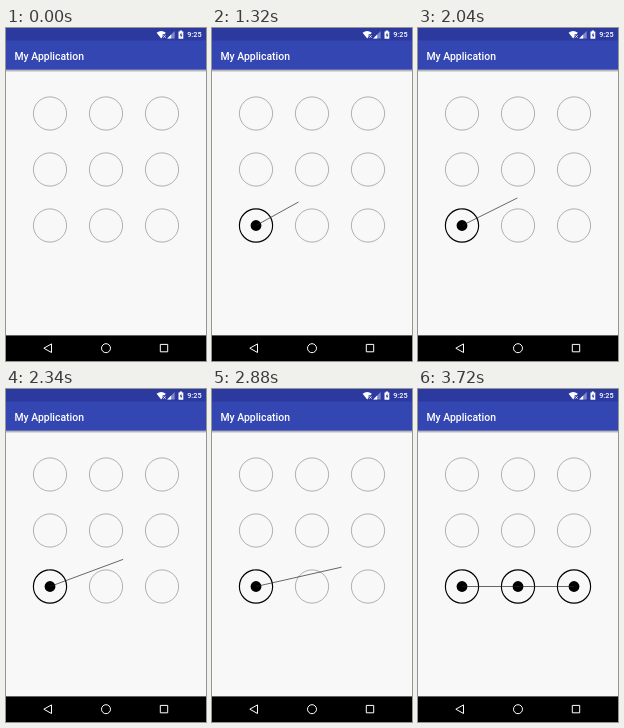
Recreate the animation shown at these times as an HTML page. Size 200 px wide and 333 px high, loop 4320 ms.

```html
<!DOCTYPE html>
<html lang="en">
<head>
<meta charset="utf-8">
<title>Pattern lock</title>
<style>
  html, body { margin: 0; width: 100%; height: 100%; overflow: hidden; background: #f8f8f8; }
  svg { display: block; width: 100vw; height: 100vh; }
  text { font-family: Roboto, sans-serif; font-weight: 500; fill: #fff; }
  .ring { fill: none; stroke: #8c8c8c; stroke-width: .68; }
  .dot { fill: #000; visibility: hidden; }
  .on .ring { stroke: #000; stroke-width: 1.15; }
  .on .dot { visibility: visible; }
  #trail { fill: none; stroke: #222; stroke-width: .68; }
</style>
</head>
<body>
<svg viewBox="0 0 200 333" preserveAspectRatio="none">
  <defs>
    <linearGradient id="shade" x1="0" y1="0" x2="0" y2="1">
      <stop offset="0" stop-color="#000" stop-opacity=".38"/>
      <stop offset="1" stop-color="#000" stop-opacity="0"/>
    </linearGradient>
  </defs>
  <rect width="200" height="333" fill="#f8f8f8"/>
  <rect y="41.6" width="200" height="2.8" fill="url(#shade)"/>
  <rect width="200" height="41.7" fill="#3446b2"/>
  <rect width="200" height="12.5" fill="#2c3a9f"/>
  <text x="8.5" y="31.7" font-size="10.42">My Application</text>

  <!-- status icons -->
  <g fill="#fff">
    <path d="M150.6 4.8Q155.2 1.4 159.8 4.8L158.6 6.3H156.6V8.8L155.2 10.5Z"/>
    <path d="M157.3 7.2l2.4 2.6m0-2.6l-2.4 2.6" fill="none" stroke="#fff" stroke-width=".7"/>
    <path d="M168.7 2.9V10.5H161.2Z" opacity=".4"/>
    <path d="M165.2 6.5V10.5H161.2Z"/>
    <path d="M173.8 3.4V2.6H176V3.4H177.3V10.8H172.5V3.4Z"/>
    <path d="M175.4 4.5L173.7 7.5H174.8V9.7L176.4 6.7H175.4Z" fill="#2c3a9f"/>
  </g>
  <text x="195.6" y="9.4" font-size="7.3" text-anchor="end">9:25</text>

  <!-- navigation bar -->
  <rect y="307.4" width="200" height="25.6" fill="#000"/>
  <g fill="none" stroke="#fff" stroke-linejoin="round">
    <path d="M37.8 320.2L45.5 315.9V324.5Z"/>
    <circle cx="100" cy="320.2" r="4.5"/>
    <rect x="154.3" y="316.4" width="7.4" height="7.4"/>
  </g>

  <g id="nodes"></g>
  <path id="trail"/>
</svg>
<script>
const LOOP = 4320, TICK = 60;
const PRESS = 660, JOIN = 3600;
const GAP = 56, LEFT = 44, TOP = 85.5;
const START = { x: LEFT, y: TOP + 2 * GAP };
const GOAL = { x: LEFT + 2 * GAP, y: START.y };

// the finger glides to each point in turn and rests in between
const moves = [
  { from: 780, to: 1020, x: 70, y: 183 },
  { from: 1200, to: 1320, x: 86.5, y: 174 },
  { from: 1320, to: 2040, x: 99.3, y: 170 },
  { from: 2040, to: 2160, x: 115.5, y: 169.6 },
  { from: 2280, to: 2700, x: 127, y: 174.9 },
  { from: 2760, to: 3180, x: 136, y: 186.3 },
  { from: 3420, to: JOIN, ...GOAL }
];

const trail = document.getElementById('trail');
const box = document.getElementById('nodes');
const nodes = [];

function make(tag, parent, attrs = {}) {
  const el = document.createElementNS('http://www.w3.org/2000/svg', tag);
  for (const key in attrs) el.setAttribute(key, attrs[key]);
  return parent.appendChild(el);
}

for (let i = 0; i < 9; i++) {
  const cx = LEFT + i % 3 * GAP, cy = TOP + Math.floor(i / 3) * GAP;
  const node = make('g', box);
  make('circle', node, { class: 'ring', cx, cy, r: 16.6 });
  make('circle', node, { class: 'dot', cx, cy, r: 5.4 });
  nodes.push(node);
}

function finger(t) {
  let { x, y } = START;
  for (const move of moves) {
    const part = Math.min(1, Math.max(0, (t - move.from) / (move.to - move.from)));
    x += (move.x - x) * part;
    y += (move.y - y) * part;
  }
  return `${x} ${y}`;
}

function draw(time) {
  const t = Math.floor(time / TICK) * TICK;
  nodes[6].classList.toggle('on', t >= PRESS);
  nodes[7].classList.toggle('on', t >= JOIN);
  nodes[8].classList.toggle('on', t >= JOIN);
  trail.setAttribute('d', t > moves[0].from ? `M${START.x} ${START.y}L${finger(t)}` : '');
}

const begin = performance.now();
function tick() {
  draw((performance.now() - begin) % LOOP);
  requestAnimationFrame(tick);
}
tick();
</script>
</body>
</html>
```
